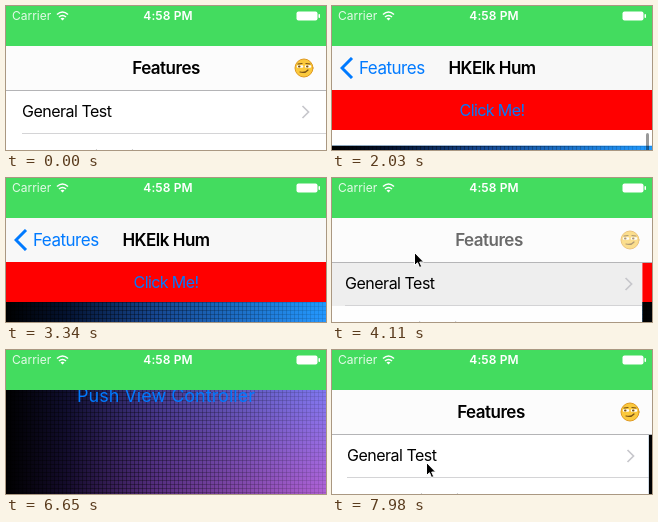
An HTML page for the animation above (8000 ms loop, 320 by 144 pixels).

```html
<!DOCTYPE html>
<html lang="en">
<head>
<meta charset="utf-8">
<title>Collapsing navigation bar</title>
<style>
html, body { margin: 0; width: 100%; height: 100%; overflow: hidden; }
#stage { position: relative; width: 320px; height: 144px; overflow: hidden; background: #fff;
  font: 16px Inter, "Liberation Sans", sans-serif; white-space: nowrap; }
#stage div, #stage svg { position: absolute; }
#list, #detail { left: 0; top: 40px; width: 320px; height: 104px; background: #fff; overflow: hidden; }
.row { left: 0; width: 320px; height: 44px; line-height: 43px; }
.row div { left: 16px; letter-spacing: -.5px; }
.row .hi { left: 0; width: 320px; height: 44px; background: #d9d9d9; }
.row .line { left: 16px; right: 0; bottom: 0; height: 1px; background: #d4d4d6; }
.row svg { left: 295px; top: 15px; }
#dim { inset: 0; background: #000; }
#image { left: 0; width: 320px; height: 900px; background:
  linear-gradient(90deg, #000, #000014e0 60px, #0a003288 150px, transparent),
  linear-gradient(#1f9aff, #468cff 100px, #7f78f0 226px, #b060d4 330px, #d05090); }
#image::before { content: ""; position: absolute; inset: 0; background:
  repeating-linear-gradient(#0005 0 1px, transparent 1px 4px),
  repeating-linear-gradient(90deg, #0005 0 1px, transparent 1px 4px);
  mask-image: linear-gradient(90deg, #000 40%, #0004); }
.link { width: 320px; text-align: center; color: #007aff; }
#push { top: 220px; font-size: 18px; line-height: 24px; }
#red { left: 0; width: 320px; height: 40px; line-height: 40px; background: #f00; letter-spacing: -.6px; }
#thumb { left: 314px; width: 3px; height: 250px; border-radius: 2px; background: #0006; }
#nav { left: 0; top: 40px; width: 320px; height: 44px; line-height: 44px; font-size: 17px;
  letter-spacing: -.5px; }
#edge { left: 0; top: 44px; width: 320px; height: 1px; background: #b4b4b6; }
.title { width: 320px; text-align: center; font-weight: 600; }
#back { left: 27px; color: #007aff; }
#status { left: 0; top: 0; width: 320px; height: 40px; background: #43dc5f; color: #fff;
  font-size: 12px; line-height: 20px; }
#clock { width: 324px; text-align: center; font-weight: 600; letter-spacing: .1px; }
</style>
</head>
<body>
<div id="stage">
  <div id="list">
    <div class="row" style="top:44px"><div class="hi"></div><div>General Test</div>
      <svg width="9" height="14" fill="none" stroke="#c7c7cc" stroke-width="1.700"><path d="M1.500 1l6 6-6 6"/></svg>
      <div class="line"></div></div>
    <div class="row" style="top:89px"><div class="hi"></div><div>No Extension View Test</div>
      <svg width="9" height="14" fill="none" stroke="#c7c7cc" stroke-width="1.700"><path d="M1.500 1l6 6-6 6"/></svg>
      <div class="line"></div></div>
    <div id="dim"></div>
  </div>
  <div id="detail">
    <div id="image"><div id="push" class="link">Push View Controller</div></div>
    <div id="red" class="link">Click Me!</div>
    <div id="thumb"></div>
  </div>
  <div id="nav">
    <div id="edge"></div>
    <div id="home" class="title">Features</div>
    <svg id="smirk" style="left:288px;top:12px" width="20" height="20" fill="none" stroke="#7a5215" stroke-linecap="round">
      <circle cx="10" cy="10" r="9" fill="#fbc93c" stroke="#e09a22"/>
      <path d="M4 6l4-.5M12 5.500l4 .5M6 14q5 1.500 8-2" stroke-width="1.200"/>
      <path d="M4 8.500h4M12 8.500h4" stroke="#fff" stroke-width="2.500"/>
      <path d="M5 8.500h.5M13 8.500h.5" stroke-width="2"/>
    </svg>
    <svg id="chevron" style="left:8px;top:11px" width="14" height="22" fill="none" stroke="#007aff" stroke-width="3"><path d="M12 1L2 11l10 10"/></svg>
    <div id="back">Features</div>
    <div id="name" class="title">HKElk Hum</div>
  </div>
  <div id="status">
    <div style="left:6px;opacity:.85">Carrier</div>
    <svg style="left:50px;top:5px" width="13" height="10" fill="none" stroke="#fff" stroke-width="1.600">
      <path d="M1 3.500q5.500-5 11 0M3 6q3.500-3 7 0"/><path d="M4.500 7.500q2-1.500 4 0l-2 2z" fill="#fff" stroke="none"/>
    </svg>
    <div id="clock">4:58 PM</div>
    <svg style="left:290px;top:5px" width="25" height="10" fill="#fff">
      <rect x=".5" y=".5" width="21" height="9" rx="2"/><rect x="22.500" y="3" width="1.500" height="4" rx=".7"/>
    </svg>
  </div>
  <svg id="cursor" style="left:0;top:0;overflow:visible" width="10" height="16">
    <path d="M.5.500v13l3-2.800 2 4.800 2.200-1-2-4.500h4z" fill="#000" stroke="#fff"/>
  </svg>
</div>
<script>
const LOOP = 8000, BAR = 44, EXT = 40;
// start time, 1 = open / 0 = close, row
const moves = [[870, 1, 0], [3730, 0, 0], [4880, 1, 1], [7510, 0, 1]];
// time, scroll offset
const scrolls = [
  [[1730, 0], [1850, -18], [1990, -18], [2500, 106], [3110, 0]],
  [[5590, 0], [5790, -48], [6650, 270], [7240, 0]]
];
// time, x, y
const path = [[400, 90, 160], [720, 88, 108], [1000, 88, 108], [1400, 90, 160],
  [3290, 62, 160], [3640, 66, 62], [3850, 66, 62], [4110, 82, 74], [4350, 94, 150],
  [4540, 94, 146], [4650, 94, 136], [4980, 94, 136], [5300, 94, 160],
  [7250, 62, 160], [7440, 66, 62], [7630, 66, 62], [7980, 94, 112], [8000, 94, 114]];

const $ = id => document.getElementById(id);
const rows = document.querySelectorAll('.hi');
const clamp = (v, lo = 0, hi = 1) => Math.min(hi, Math.max(lo, v));
const shift = (id, x, y = 0) => $(id).style.transform = `translate(${x}px,${y}px)`;
const fade = (a, ...ids) => ids.forEach(id => $(id).style.opacity = a);

function along(keys, t, i) {
  const k = keys.findIndex(key => key[0] > t);
  if (k < 1) return keys[k ? keys.length - 1 : 0][i];
  const a = keys[k - 1], b = keys[k], u = (t - a[0]) / (b[0] - a[0]);
  return a[i] + (b[i] - a[i]) * u * u * (3 - 2 * u);
}

function draw(t) {
  const [start, open, row] = moves.findLast(m => m[0] <= t) || [-LOOP, 0, 0];
  const age = (t - start) / 1000, u = 14 * age;
  const slide = age > .62 ? 1 : 1 - (1 + u) * Math.exp(-u);
  const p = open ? slide : 1 - slide;
  const appear = clamp((age - .26) / .21), vanish = 1 - clamp(age / .25);
  const homeA = open ? vanish : appear, nameA = open ? appear : vanish;

  const keys = scrolls[row], ext = row ? 0 : EXT;
  const s = along(keys, t, 1), c = clamp(s - ext, 0, BAR);
  const base = BAR + ext;

  shift('list', -96 * p);
  fade(.1 * p, 'dim');
  rows.forEach((el, i) => {
    const pressed = moves.some(m => m[1] && m[2] === i && t < m[0] && t > m[0] - 80);
    el.style.opacity = pressed ? 1 : i === row ? (open ? 1 : 1 - appear) : 0;
  });

  $('detail').style.visibility = p > 0 ? 'visible' : 'hidden';
  shift('detail', 320 * (1 - p));
  shift('image', 0, base - s);
  shift('red', 0, BAR - clamp(s, 0, EXT) - c);
  $('red').style.display = row ? 'none' : 'block';
  shift('thumb', 0, base - clamp(s, 0, base) + 3 + Math.max(s, 0) * (row ? .5 : .05));
  const first = keys[0][0], last = keys[keys.length - 1][0];
  fade(clamp((t - first) / 60) * clamp((last + 200 - t) / 200), 'thumb');

  const shown = 1 - c / BAR;
  shift('nav', 0, -c);
  $('nav').style.background = p > .5 ? '#f8f8f8' : '#fcfcfc';
  shift('home', -100 * p);
  shift('back', 100 * (1 - p));
  shift('name', 120 * (1 - p));
  fade(homeA * shown, 'home', 'smirk');
  fade(nameA * shown, 'back', 'chevron', 'name');
  fade(row ? shown : 1 - p, 'edge');

  shift('cursor', along(path, t, 1), along(path, t, 2));
}

function tick() {
  draw(performance.now() % LOOP);
  requestAnimationFrame(tick);
}
tick();
</script>
</body>
</html>
```
